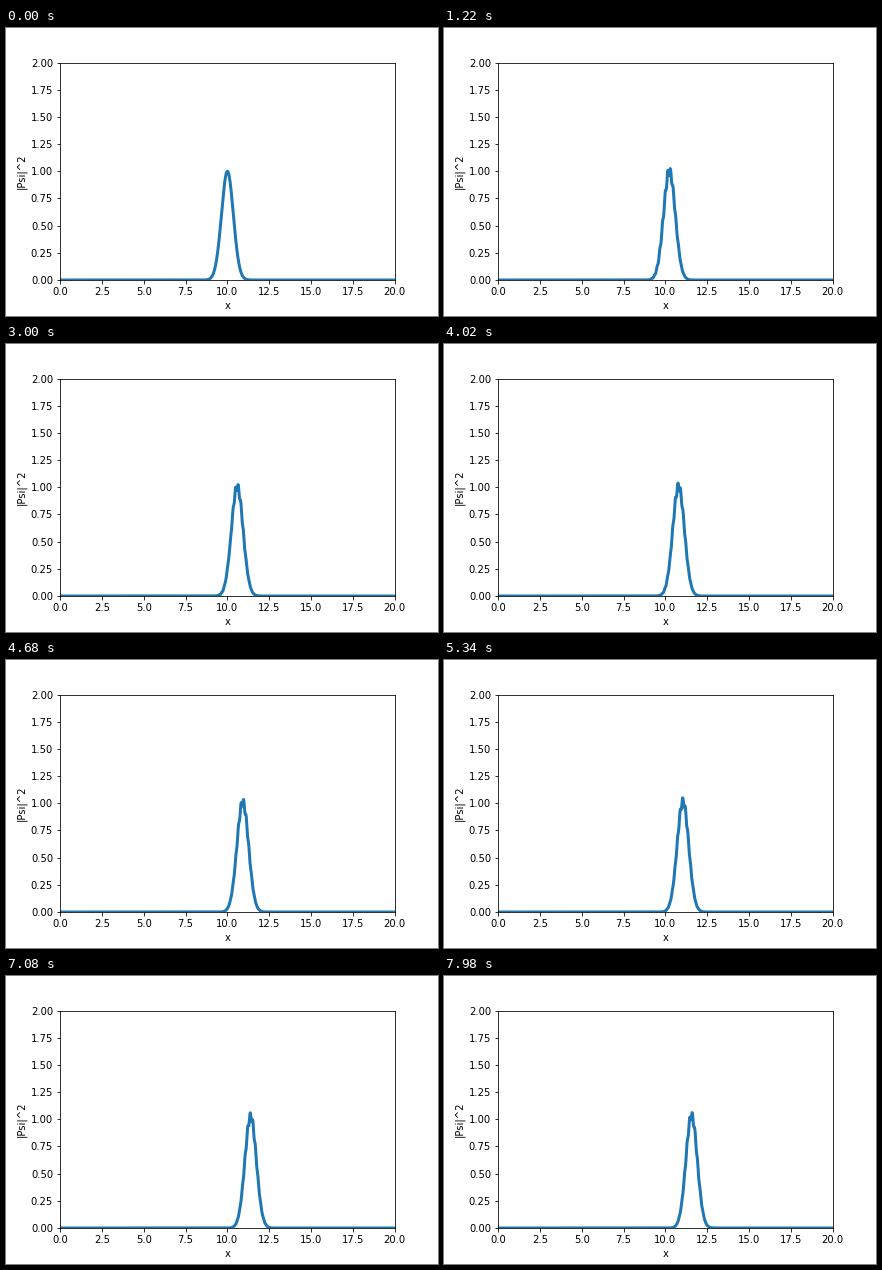
Write a matplotlib script that moves like this. It is 432x288 px and loops after 8000 ms.

```python
import numpy as np
import matplotlib.pyplot as plt
from matplotlib.animation import FuncAnimation

FRAMES = 400
INTERVAL = 20        # ms

START = 10.0
SPEED = 0.196        # units of x per second
WIDTH = 0.5
WAVENUMBER = 20.0
RIPPLE = 0.035
FOCUS = 0.035        # relative narrowing over one loop

plt.rcParams["font.family"] = "DejaVu Sans"
plt.rcParams["font.size"] = 10

x = np.linspace(0, 20, 1000)


def density(t):
    """Drifting Gaussian with ripples from the staggered time steps."""
    u = x - START
    shift = SPEED * t
    gain = 1 + FOCUS * (t / 8) ** 2
    packet = gain * np.exp(-((u - shift) * gain / WIDTH) ** 2)
    # overlap of the packet with its weak, backward moving partner
    overlap = np.exp(-(u ** 2 + shift ** 2) / WIDTH ** 2)
    moving = np.sin(2 * WAVENUMBER * u - WAVENUMBER * shift)
    standing = np.sin(2 * WAVENUMBER * u)
    return packet + RIPPLE * (packet * moving - overlap * standing)


fig = plt.figure(figsize=(6, 4), dpi=72, facecolor="white")
fig.subplots_adjust(left=0.125, right=0.9, bottom=0.125, top=0.88)
ax = fig.add_subplot(xlim=(0, 20), ylim=(0, 2))
ax.set_xlabel("x")
ax.set_ylabel("|Psi|^2")
line, = ax.plot(x, density(0), lw=3, color="#1f77b4")


def init():
    line.set_ydata(density(0))
    return line,


def update(frame):
    line.set_ydata(density(frame * INTERVAL / 1000))
    return line,


anim = FuncAnimation(fig, update, frames=FRAMES, init_func=init,
                     interval=INTERVAL, blit=True, repeat=True)
plt.show()
```
